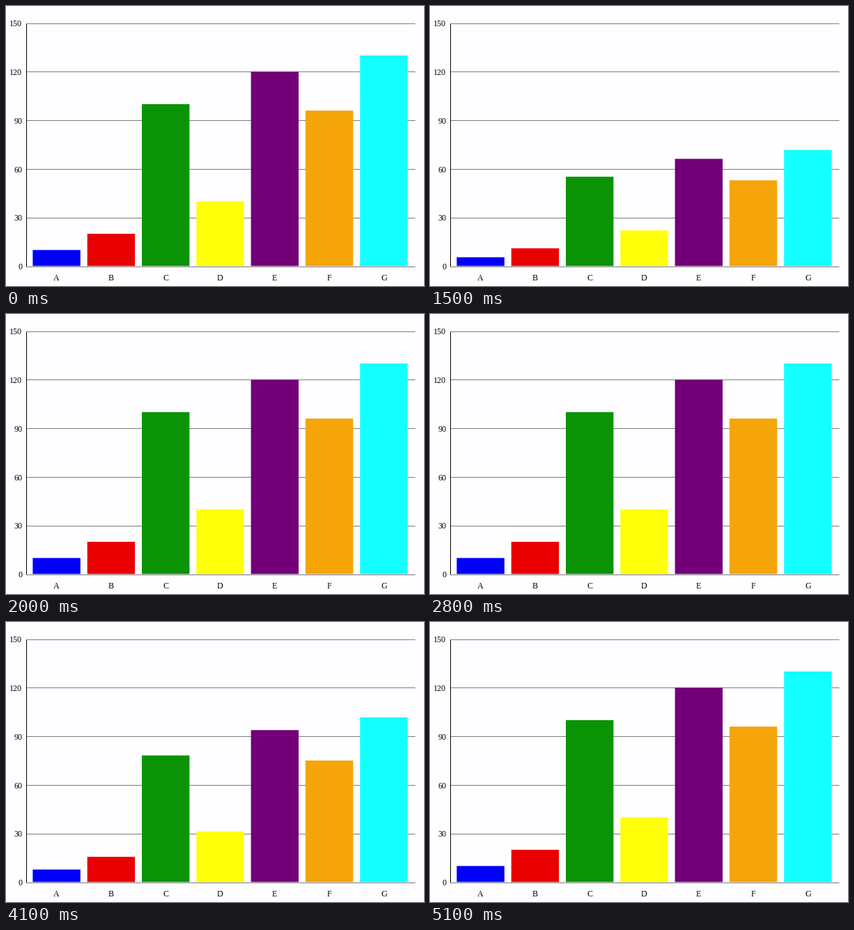
Recreate the animation shown at these times as a matplotlib script. Size 600 px wide and 402 px high, loop 5.2 s.

```python
import matplotlib.pyplot as plt
from matplotlib.animation import FuncAnimation
from matplotlib.patches import Rectangle

W, H, DPI = 600, 402, 96
STEP_MS, FRAMES = 100, 52
LEFT, RIGHT, TOP, BASE = 28.5, 587, 24.5, 373.6
Y_MAX, Y_STEP = 150, 30
BAR_X, BAR_W, PITCH = 38.4, 68.4, 78.3
BACKGROUND, GRID = "#fefdff", "#7c7c80"

BARS = [
    ("A", 10, "#0000fa"),
    ("B", 20, "#ea0000"),
    ("C", 100, "#0a9405"),
    ("D", 40, "#ffff0a"),
    ("E", 120, "#730078"),
    ("F", 96, "#f5a508"),
    ("G", 130, "#14ffff"),
]

# Each regrowth: first visible time, time and level on its straight ramp.
REGROWTHS = [(1300, 1500, 0.552), (3900, 4100, 0.782)]
RATE = 0.0903 / 100


def y_of(value):
    return BASE - value * (BASE - TOP) / Y_MAX


def level(ms):
    for start, ref_ms, ref_level in reversed(REGROWTHS):
        if ms >= start:
            return min(1, ref_level + (ms - ref_ms) * RATE)
    return 1


fig = plt.figure(figsize=(W / DPI, H / DPI), dpi=DPI, facecolor=BACKGROUND)
ax = fig.add_axes([0, 0, 1, 1])
ax.set_xlim(0, W)
ax.set_ylim(H, 0)
ax.axis("off")


def label(x, y, text, align):
    ax.text(x, y, text, ha=align, va="baseline", family="Liberation Serif",
            size=12 * 72 / DPI, color="black")


def line(xs, ys, color, z):
    ax.plot(xs, ys, color=color, lw=72 / DPI, solid_capstyle="butt", zorder=z)


for value in range(0, Y_MAX + 1, Y_STEP):
    y = y_of(value)
    line([LEFT, RIGHT], [y, y], GRID, 1)
    label(23.3, y + 4.6, str(value), "right")
line([LEFT, LEFT], [TOP, BASE + 0.4], "black", 3)

rects = []
for i, (name, value, color) in enumerate(BARS):
    x = BAR_X + i * PITCH
    rects.append(ax.add_patch(
        Rectangle((x, BASE - 0.3), BAR_W, 0, fc=color, lw=0, zorder=2, snap=False)))
    label(x + BAR_W / 2, 393.7, name, "center")


def draw(frame):
    grown = level(frame * STEP_MS)
    for rect, (_, value, _) in zip(rects, BARS):
        rect.set_height(y_of(value * grown) - rect.get_y())
    return rects


anim = FuncAnimation(fig, draw, frames=FRAMES, interval=STEP_MS,
                     repeat=True, repeat_delay=0, blit=False)
plt.show()
```
